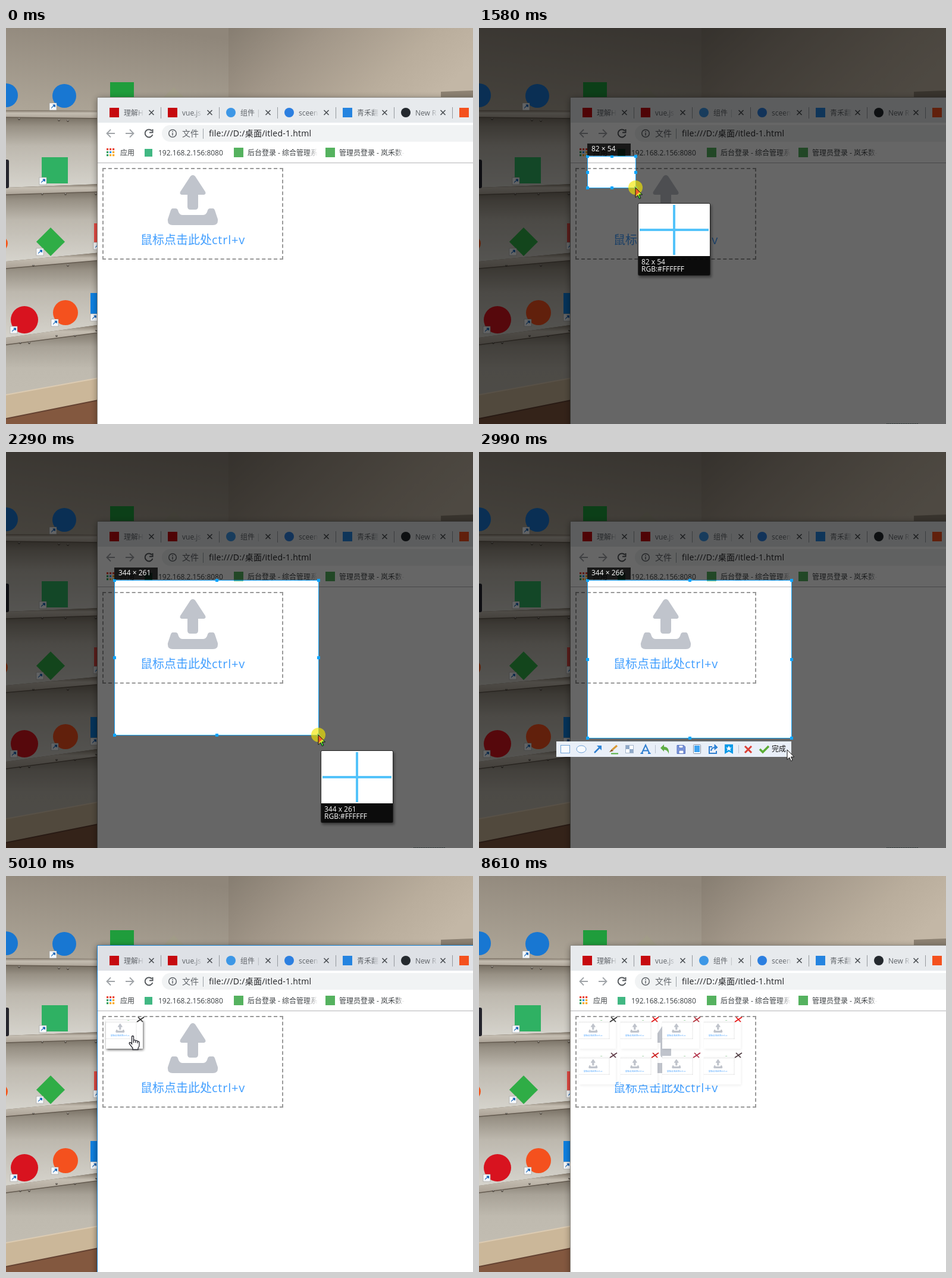
An HTML page for the animation above (8.67 s loop, 785 px wide and 665 px high).

```html
<!DOCTYPE html>
<html lang="zh-CN">
<head>
<meta charset="utf-8">
<title>粘贴上传</title>
<style>
html,body{margin:0;width:100%;height:100%;overflow:hidden;background:#fff}
svg{display:block}
text{font:12px "Open Sans","Noto Sans CJK SC","Noto Sans CJK",sans-serif;white-space:pre}
.dark{fill:#3c4043}
.white{fill:#fff}
</style>
</head>
<body>
<svg id="stage" width="785" height="665" viewBox="0 0 785 665">
<defs>
  <linearGradient id="wallL" x1=".6" x2=".3" y2="1"><stop stop-color="#8f867a"/><stop offset="1" stop-color="#aea698"/></linearGradient>
  <linearGradient id="wallR" x2="1" y2=".4"><stop stop-color="#867d71"/><stop offset=".35" stop-color="#a19688"/><stop offset=".75" stop-color="#b9ad9c"/><stop offset="1" stop-color="#c3b7a6"/></linearGradient>
  <linearGradient id="panel" x2="0" y2="1"><stop offset=".08" stop-color="#756d61"/><stop offset=".2" stop-color="#979084"/><stop offset=".45" stop-color="#bdb8ae"/><stop offset="1" stop-color="#d7d5ce"/></linearGradient>
  <linearGradient id="low" x2="0" y2="1"><stop offset=".08" stop-color="#7a7266"/><stop offset=".3" stop-color="#a8a297"/><stop offset=".6" stop-color="#bfbaaf"/><stop offset="1" stop-color="#c2bdb2"/></linearGradient>
  <linearGradient id="board" x2="0" y2="1"><stop stop-color="#7d7366"/><stop offset=".35" stop-color="#c4bdb1"/><stop offset="1" stop-color="#aaa195"/></linearGradient>
  <linearGradient id="fade"><stop offset=".65" stop-color="#5f6368"/><stop offset="1" stop-color="#5f6368" stop-opacity=".1"/></linearGradient>
  <linearGradient id="fadeLong"><stop offset=".85" stop-color="#3c4043"/><stop offset="1" stop-color="#3c4043" stop-opacity="0"/></linearGradient>
  <linearGradient id="rainbow" x2=".6" y2="1"><stop stop-color="#ff5a1f"/><stop offset=".5" stop-color="#f0622c"/><stop offset=".6" stop-color="#f3e52c"/><stop offset=".85" stop-color="#35e23c"/></linearGradient>
  <filter id="blur" x="-10%" y="-10%" width="120%" height="120%"><feGaussianBlur stdDeviation="6"/></filter>
  <filter id="soft" x="-20%" y="-20%" width="140%" height="140%"><feGaussianBlur stdDeviation="2"/></filter>
  <path id="arrow" d="M0 0V16.5L3.8 13L6.4 18.8L9 17.6L6.5 12H11.6Z"/>
  <g id="link">
    <rect width="12" height="12" fill="#f6f8fa" stroke="#999" stroke-width=".6"/>
    <path d="M3 10Q3 5.500 7 5L5.500 3.500L6 2.500H10V6.500L9 7L8 6Q5 6 3 10Z" fill="#1b68b8"/>
  </g>
  <g id="drop">
    <g fill="none" stroke="#999" stroke-width="2">
      <path d="M162 236H466M162 388H466" stroke-dasharray="6 3.933"/>
      <path d="M163 235V389M465 235V389" stroke-dasharray="6 3.867"/>
    </g>
    <path fill="#c0c4cc" d="M310 249Q314 245 318 249L335 275Q337 280 331 280H323V300Q323 305 318 305H310Q305 305 305 300V280H297Q291 280 293 275ZM280 303H285Q288 303 289 306L290 309Q292 314 297 314H331Q336 314 338 309L339 306Q340 303 343 303H348Q350 303 351 306L356 321Q357 331 348 331H280Q271 331 272 321L277 306Q278 303 280 303Z"/>
    <text x="226" y="363" fill="#409eff" style="font-size:20px">鼠标点击此处<tspan letter-spacing=".8">ctrl+v</tspan></text>
  </g>
</defs>

<g id="room">
  <rect width="376" height="150" fill="url(#wallL)"/>
  <rect x="374" width="411" height="150" fill="url(#wallR)"/>
  <path d="M731 107L785 105V118H731Z" fill="#8d8273"/>
</g>
<g id="icons">
  <circle cy="113" r="20" fill="#1877d2"/>
  <circle cx="98" cy="114" r="20" fill="#1877d2"/>
  <rect x="175" y="91" width="40" height="40" fill="#1f9d3c"/>
  <rect x="266" y="106" width="32" height="32" fill="#a19c88" transform="rotate(45 282 122)"/>
  <rect x="-43" y="221" width="48" height="48" rx="3" fill="#24242c"/>
  <rect x="60" y="217" width="44" height="44" fill="#2fb163"/>
  <rect x="58" y="342" width="34" height="34" fill="#2fad46" transform="rotate(45 75 359)"/>
  <circle cx="-10" cy="362" r="13" fill="#f4571c"/>
  <rect x="148" y="328" width="40" height="40" fill="#e64a43"/>
  <circle cx="31" cy="490" r="23" fill="#d8131f"/>
  <circle cx="100" cy="478" r="21" fill="#f4511e"/>
  <rect x="142" y="445" width="44" height="44" fill="#0d80e0"/>
</g>

<rect id="shade" x="154" y="119" width="700" height="620" filter="url(#blur)"/>
<rect x="154" y="117" width="631" height="548" fill="#fff"/>
<rect id="strip" x="154" y="117" width="631" height="42"/>
<path id="edge" d="M785 116.500H153.500V665" fill="none"/>
<g id="tabs"></g>
<g fill="none" stroke="#a0a4a8" stroke-width="1.800">
  <path d="M183 177H170M176 170.500L169.500 177L176 183.500M201 177H214M208 170.500L214.500 177L208 183.500"/>
  <path d="M245 172.500A6.500 6.500 0 1 0 246.400 179M246.500 170V175.500H241" stroke="#55595d" stroke-width="2"/>
</g>
<rect x="262" y="163" width="560" height="28" rx="14" fill="#f1f3f4"/>
<g fill="none" stroke="#5f6368" stroke-width="1.500"><circle cx="280" cy="177" r="6.300"/><path d="M280 176V180.500M280 173V174.700"/></g>
<text x="296" y="182" fill="#5f6368" style="font-size:14px">文件</text>
<path d="M331.500 169V186" stroke="#9aa0a6"/>
<text x="341" y="182" fill="#202124" letter-spacing=".25" style="font-size:14px">file:///D:/桌面/itled-1.html</text>
<g id="apps"></g>
<text class="dark" x="192" y="214">应用</text>
<rect x="233" y="203" width="13" height="13" fill="#41b883"/>
<text class="dark" x="256" y="214">192.168.2.156:8080</text>
<rect x="383" y="201" width="16" height="16" fill="#55b25f"/>
<text x="406" y="214" fill="url(#fadeLong)">后台登录 - 综合管理系</text>
<rect x="537" y="201" width="16" height="16" fill="#55b25f"/>
<text x="560" y="214" fill="url(#fadeLong)">管理员登录 - 岚禾数-</text>
<path d="M154 226.500H785" stroke="#b4b5b6"/>
<use href="#drop"/>
<g id="thumbs"></g>
<path id="tip" d="M685 664.500H738" stroke="#6f8585" stroke-dasharray="2 1"/>

<g id="grab">
  <path id="dim" fill-opacity=".6" fill-rule="evenodd"/>
  <rect id="frame" fill="none" stroke="#1aa6fb"/>
  <path id="knobs" fill="#0ea5ff"/>
  <rect x="182" y="194" width="73" height="20" fill-opacity=".76"/>
  <text id="size" class="white" x="189" y="207"></text>
</g>
<g id="tools" fill="none" stroke="#2f7fd0">
  <rect x="130" y="486" width="395" height="26" fill="#e9eff8" stroke="none"/>
  <rect x="137.500" y="492.500" width="15" height="13" fill="#f8fbff" stroke="#6fa1d6"/>
  <ellipse cx="172" cy="499" rx="8" ry="6" fill="#f8fbff" stroke="#6fa1d6"/>
  <path d="M194 505L203 496" stroke-width="2.500"/><path d="M198 493H206V501Z" fill="#2f86d8" stroke="none"/>
  <path d="M219 504L223 499L226 502Z" fill="#8b5a24" stroke="none"/><path d="M224 500L232 493" stroke="#d99a36" stroke-width="3"/><path d="M222 506.500H234" stroke="#53ae3d" stroke-width="2"/>
  <rect x="246.500" y="492.500" width="13" height="13" fill="#fff" stroke="#a5b6cb"/><path d="M247 493H253V499H259V505H253V499H247Z" fill="#8fa9c9" stroke="none"/>
  <path d="M273.500 506L280 492L286.500 506M276 501.500H284M271.500 506H276M284 506H288.500" stroke-width="2"/>
  <path d="M296.500 492V506M436.500 492V506" stroke="#b9c3d0"/>
  <path d="M305 497L311 491V495Q320 495 319 507Q317 500 311 500V503Z" fill="#5fae45" stroke="none"/>
  <path d="M333 492.500H344L346.500 495V506.500H333Z" fill="#7d97dc" stroke="#5470bd"/><path d="M336 493V497H343V493M336 506V501H344V506" fill="#fff" stroke="#5470bd"/>
  <rect x="360.500" y="491.500" width="12" height="15" rx="1" fill="#fff" stroke="#7f8fa6"/><rect x="362" y="493" width="9" height="11" fill="#3fa4f2" stroke="none"/>
  <path d="M392 495H387V506H399V502M390 502Q391 496 397 496" stroke-width="2"/><path d="M396 491L401 496L396 500Z" fill="#2f86d8"/>
  <path d="M413 491H427V507L420 503L413 507Z" fill="#0c9be8" stroke="none"/><path d="M420 493L421.500 496.500H425L422.200 498.500L423.300 502L420 500L416.700 502L417.800 498.500L415 496.500H418.500Z" fill="#fff" stroke="none"/>
  <path d="M447 494L458 505M458 494L447 505" stroke="#dc3f35" stroke-width="3"/>
  <path d="M472 499L477 504L487 494" stroke="#5aad35" stroke-width="3.500"/>
  <text x="492" y="503" fill="#111" stroke="none">完成</text>
</g>
<g id="lens">
  <rect x="2" y="3" width="122" height="122" rx="2" fill-opacity=".4" filter="url(#soft)"/>
  <rect x="1" y="1" width="120" height="88" fill="#fff"/>
  <g id="bits"></g>
  <path d="M61 3V87M3 45H119" stroke="#53c3fa" stroke-width="4"/>
  <rect x="1" y="89" width="120" height="32" fill-opacity=".8"/>
  <rect x=".5" y=".5" width="121" height="121" rx="2" fill="none" stroke="#222"/>
  <text id="lensSize" class="white" x="6" y="103"></text>
  <text class="white" x="6" y="115">RGB:#FFFFFF</text>
</g>
<g id="cursor">
  <circle id="press" r="12" fill="#f3e600" fill-opacity=".65"/>
  <use id="plain" href="#arrow" fill="#fff" stroke="#111"/>
  <use id="vivid" href="#arrow" fill="url(#rainbow)" stroke="#111"/>
  <path id="hand" d="M-1.500 1.500Q0 -.5 1.500 1.500V8Q3.500 6.500 4.800 8.500Q7 7.500 8 9.500Q10.500 9 11 11.500V16Q11 19 9 21V23.500H0V21L-5.500 14Q-6.500 11.500 -4.500 11.500Q-3 11.500 -1.500 14ZM1.500 8V12M4.800 9V12M8 10V13" fill="#fff" stroke="#23232b" stroke-width="1.300"/>
</g>
</svg>
<script>
const LOOP = 8670;
const $ = id => document.getElementById(id);
const attrs = (id, set) => { for (const k in set) $(id).setAttribute(k, set[k]); };
const show = (id, on) => { $(id).style.display = on ? '' : 'none'; };
const square = (x, y, s, fill) => `<rect x="${x}" y="${y}" width="${s}" height="${s}" fill="${fill}"/>`;

// Shelves: board height at the left edge and at the window.
const shelves = [[138, 139], [268, 262], [392, 377], [520, 498], [617, 590]];
const boards = shelves.slice(0, 4);
let room = '';
boards.forEach(([l, r], i) => {
  const [nl, nr] = shelves[i + 1];
  room += `<path d="M0 ${l}L160 ${r}V${nr + 4}L0 ${nl + 4}Z" fill="url(#${i < 3 ? 'panel' : 'low'})"/>`;
});
for (const [l, r] of boards) {
  room += `<path d="M0 ${l}L160 ${r}V${r + 13}L0 ${l + 12}Z" fill="url(#board)"/>
    <path d="M0 ${l + 12}L160 ${r + 13}" stroke="#645b50" stroke-width="1.5"/>`;
}
room += `<path d="M0 616L160 587V665H0Z" fill="#cbb799"/><path d="M0 616L160 587" stroke="#dccbb2" stroke-width="2"/>
  <path d="M0 656L160 624V665H0Z" fill="#83583f"/><path d="M0 656L160 624" stroke="#644232" stroke-width="2"/>`;
const pins = [[22, 153], [89, 155], [104, 156], [61, 279], [100, 279], [151, 279], [46, 399], [104, 399],
  [85, 517], [116, 517], [24, 529], [39, 529], [152, 508]];
for (const [x, y] of pins) room += `<circle cx="${x}" cy="${y}" r="1.800" fill="#4e463d"/><circle cx="${x}" cy="${y - 1}" r=".8" fill="#ddd"/>`;
$('room').innerHTML += room;
$('icons').innerHTML += [[73, 126], [56, 251], [51, 370], [7, 501], [76, 489], [142, 480], [147, 360]]
  .map(([x, y]) => `<use href="#link" x="${x}" y="${y}"/>`).join('');

const tabs = [['理解H', '#c60a0f'], ['vue.js', '#c60a0f'], ['组件 |', '#3d97e6', 1], ['sceen', '#2c7fe0', 1],
  ['青禾翻', '#2584e0'], ['New R', '#24292e', 1], ['', '#f4511e']];
$('tabs').innerHTML = tabs.map(([name, color, round], i) => {
  const x = 174 + 98 * i;
  const logo = round ? `<circle cx="${x + 8}" cy="142" r="8" fill="${color}"/>` : square(x, 134, 16, color);
  return `${logo}<text x="${x + 24}" y="147" fill="url(#fade)">${name}</text>
    <path d="M${x + 66.5} 138l8 8m0 -8l-8 8" stroke="#4a4e52" stroke-width="1.600"/>
    <path d="M${x + 86.5} 133V152" stroke="#94989d"/>`;
}).join('');

const red = '#ea4335', green = '#2f9d5c', blue = '#2492f5', amber = '#f9a70a';
const grid = [red, red, red, green, blue, amber, green, amber, amber];
$('apps').innerHTML = grid.map((c, i) => square(169 + i % 3 * 5, 202 + (i / 3 | 0) * 5, 3.2, c)).join('');
const specks = ['#33363f', '#e9a27c', '#9a6db5', '#f2b58a', '#5a6cae', '#d9543f'];
$('bits').innerHTML = grid.slice(3).map((c, i) => square(7 + i % 3 * 20, 11 + (i / 3 | 0) * 20, 12, c)).join('')
  + '<path d="M107 3H119V7H107ZM107 39H119V43H107Z" fill="#33363f"/>'
  + Array.from({length: 18}, (_, i) => square((i % 2 ? 103 : 111) + i % 3 * 2, 5 + i * 2, 4, specks[i * 5 % 6])).join('');

const pasted = [5010, 5180, 5330, 5480, 5650, 5800, 5870, 6050];
const crosses = ['#333', '#e21414', '#b5303a', '#e81212', '#5c3845', '#cc1818', '#b03048', '#4d3a40'];
$('thumbs').innerHTML = crosses.map((c, i) => {
  const x = 168 + i % 4 * 70, y = 242 + (i / 4 | 0) * 60;
  return `<g id="thumb${i}"><rect id="glow${i}" x="${x + 1}" y="${y + 2}" width="62" height="48" filter="url(#soft)" opacity=".06"/>
    <svg x="${x}" y="${y}" width="62" height="48" viewBox="182 215 344 266" preserveAspectRatio="none">
      <rect x="182" y="215" width="344" height="266" fill="#fff"/>
      <path d="M182 226.500H526" stroke="#b4b5b6"/><path d="M383 216H399" stroke="#55b25f" stroke-width="4"/><use href="#drop"/></svg>
    <path d="M${x + 54} ${y - 5}l8 8m2 -8l-12 8" stroke="${c}" stroke-width="1.700"/></g>`;
}).join('');

// Screen updates come in bursts: start, end, number of updates.
const bursts = [[70, 340, 5], [580, 1430, 12], [1510, 2370, 12], [2840, 3310, 7], [3770, 4260, 7], [6420, 6890, 7]];
function snap(t) {
  for (const [a, b, n] of bursts) {
    if (t >= a && t < b) {
      const step = (b - a) / (n - 1);
      return a + Math.floor((t - a) / step + .15) * step;
    }
  }
  return t;
}

const trail = [[70, 232, 415], [137, 330, 480], [205, 520, 570], [272, 676, 648], [340, 676, 700],
  [580, 600, 690], [735, 560, 600], [900, 420, 430], [1120, 200, 250], [1200, 160, 222], [1300, 178, 215], [1430, 182, 215],
  [1509, 182, 215], [1510, 196, 225], [1700, 360, 330], [1900, 497, 403], [2140, 520, 460], [2370, 527, 482],
  [2469, 527, 482], [2470, 525, 480], [2839, 525, 480], [2840, 528, 473], [2990, 520, 500], [3150, 469, 498], [3310, 501, 497],
  [3769, 501, 497], [3770, 490, 489], [4020, 330, 350], [4260, 213, 268], [6419, 213, 268], [6420, 224, 266],
  [6580, 370, 400], [6812, 620, 640]];
function pointer(t) {
  const i = trail.findIndex(k => k[0] > t);
  if (i < 1) return trail[i ? trail.length - 1 : 0].slice(1);
  const [a, x, y] = trail[i - 1], [b, u, v] = trail[i];
  const p = (t - a) / (b - a);
  return [Math.round(x + (u - x) * p), Math.round(y + (v - y) * p)];
}

function select([x, y]) {
  const w = x - 181, h = y - 214;
  const midX = Math.round((182 + x) / 2), midY = Math.round((215 + y) / 2);
  attrs('dim', {d: `M0 0H785V665H0ZM182 215h${w}v${h}h${-w}Z`});
  attrs('frame', {x: 182.5, y: 215.5, width: w - 1, height: h - 1});
  let d = '';
  for (const kx of [182, midX, x]) for (const ky of [215, midY, y])
    if (kx !== midX || ky !== midY) d += `M${kx - 2} ${ky - 2}h5v5h-5Z`;
  attrs('knobs', {d});
  $('size').textContent = `${w} × ${h}`;
  return `${w} x ${h}`;
}

function draw(now) {
  const t = snap(now);
  const within = (a, b) => t >= a && t < b;
  const [x, y] = pointer(t);
  const active = within(4410, 8510);
  attrs('strip', {fill: active ? '#dee1e6' : '#e7eaed'});
  attrs('edge', {stroke: active ? '#1b83d4' : '#8b8780'});
  attrs('shade', {opacity: active ? .6 : .45});

  show('tip', within(580, 3770));
  const grabbing = within(1510, 3770);
  show('grab', grabbing);
  const label = grabbing ? select(t < 2690 ? [x, y] : [525, 480]) : '801 x 731';
  show('tools', within(2690, 3770));
  show('lens', within(730, 2690));
  show('bits', within(1290, 1510));
  $('lensSize').textContent = label;
  attrs('lens', {transform: `translate(${x + 4} ${y + 26})`});

  pasted.forEach((at, i) => show('thumb' + i, t >= at));
  const hover = within(5010, 6480);
  attrs('glow0', {opacity: hover ? .65 : .06});

  const vivid = within(730, 2690);
  show('cursor', within(70, 340) || within(650, 6890));
  attrs('cursor', {transform: `translate(${x} ${y})`});
  show('press', within(1430, 2690) || within(3630, 3770) || within(4410, 4550));
  show('vivid', vivid);
  show('hand', hover);
  show('plain', !vivid && !hover);
}

const start = performance.now();
function tick() {
  draw((performance.now() - start) % LOOP);
  requestAnimationFrame(tick);
}
tick();
</script>
</body>
</html>
```
